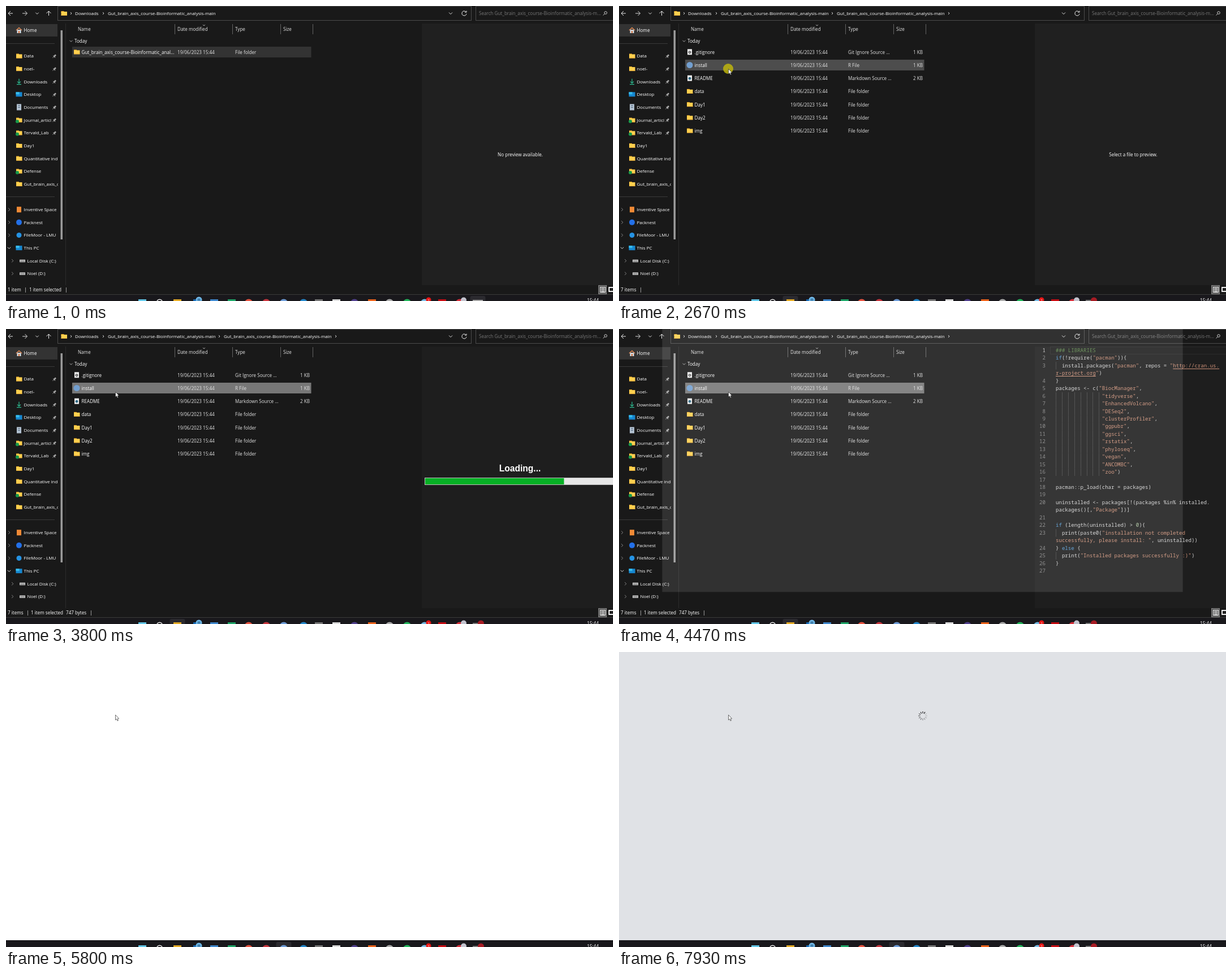
An HTML page with a canvas for the animation above (8000 ms loop, 1073 px wide and 522 px high).

```html
<!DOCTYPE html>
<html lang="en">
<head>
<meta charset="utf-8">
<title>Opening an R script</title>
<style>
  html, body { margin: 0; width: 100%; height: 100%; overflow: hidden; background: #191919; }
  canvas { display: block; }
</style>
</head>
<body>
<canvas id="stage" width="1073" height="522"></canvas>
<script>
const ctx = document.getElementById('stage').getContext('2d');
const LOOP = 8000;
const UI = '"Open Sans", "Noto Sans", sans-serif';
const MONO = '"Noto Sans Mono", "DejaVu Sans Mono", monospace';
const PROJECT = 'Gut_brain_axis_course-Bioinformatic_analysis-main';
const DATE = '19/06/2023 15:44';

const CODE = `### LIBRARIES
if(!require("pacman")){
  install.packages("pacman", repos = "http:/\/cran.us.¬r-project.org")
}
packages <- c("BiocManager",
               "tidyverse",
               "EnhancedVolcano",
               "DESeq2",
               "clusterProfiler",
               "ggpubr",
               "ggsci",
               "rstatix",
               "phyloseq",
               "vegan",
               "ANCOMBC",
               "zoo")

pacman::p_load(char = packages)

uninstalled <- packages[!(packages %in% installed.¬packages()[,"Package"])]

if (length(uninstalled) > 0){
  print(paste0("installation not completed¬successfully, please install: ", uninstalled))
} else {
  print("Installed packages successfully :)")
}
`.split('\n');

// Sidebar entries: label, icon, and whether pinned; null leaves a gap.
const SIDEBAR = [
  ['Data', 'folder', 1], ['noel-', 'folder', 1], ['Downloads', 'download', 1],
  ['Desktop', 'screen', 1], ['Documents', 'doc', 1], ['Journal_articl', 'synced', 1],
  ['Tervald_Lab', 'synced', 1], ['Day1', 'folder'], ['Quantitative ind', 'folder'],
  ['Defense', 'synced'], ['Gut_brain_axis_c', 'folder'], null,
  ['Inventive Space F', 'orange'], ['Packnest', 'blue'], ['FileMoor - LMU', 'sky'],
  ['This PC', 'screen'], ['Local Disk (C:)', 'drive'], ['Noel (D:)', 'drive'],
  ['Research (E:)', 'drive']
];

const FILES = [
  ['.gitignore', 'gear', 'Git Ignore Source ...', '1 KB'],
  ['install', 'script', 'R File', '1 KB'],
  ['README', 'note', 'Markdown Source ...', '2 KB'],
  ...['data', 'Day1', 'Day2', 'img'].map(name => [name, 'folder', 'File folder', ''])
];
const PROJECT_FOLDER = [['Gut_brain_axis_course-Bioinformatic_anal...', 'folder', 'File folder', '']];

// Time, x, y of the pointer tip.
const POINTER = [
  [70, 972, 490], [140, 905, 395], [200, 800, 265], [270, 670, 150], [300, 650, 144],
  [330, 647, 155], [450, 647, 155], [720, 440, 125], [990, 209, 76],
  [2160, 209, 76], [2340, 193, 111]
];
const PRESSES = [[1260, 1400], [1470, 1540], [2670, 2810], [3010, 3080]];
// Time, side inset, bottom edge, opacity of the new window.
const WINDOW_OPENING = [
  [4330, 107, 450, .02], [4400, 95, 457, .05], [4470, 77, 465, .1],
  [4540, 32, 490, .6], [4620, 2, 505, 1], [4690, 0, 510, 1]
];

function track(keys, t) {
  const next = keys.findIndex(key => key[0] > t);
  if (next === 0) return keys[0].slice(1);
  if (next < 0) return keys[keys.length - 1].slice(1);
  const a = keys[next - 1], b = keys[next], k = (t - a[0]) / (b[0] - a[0]);
  return a.slice(1).map((v, i) => v + (b[i + 1] - v) * k);
}

function rect(x, y, w, h, fill) {
  ctx.fillStyle = fill;
  ctx.fillRect(x, y, w, h);
}
function frame(x, y, w, h, color) {
  ctx.strokeStyle = color;
  ctx.lineWidth = 1;
  ctx.strokeRect(x + .5, y + .5, w - 1, h - 1);
}
function dot(x, y, r, fill) {
  ctx.fillStyle = fill;
  ctx.beginPath();
  ctx.arc(x, y, r, 0, Math.PI * 2);
  ctx.fill();
}
function line(points, color, width = 1) {
  ctx.strokeStyle = color;
  ctx.lineWidth = width;
  ctx.beginPath();
  points.forEach(([x, y]) => ctx.lineTo(x, y));
  ctx.stroke();
}
function text(s, x, y, { color = '#fff', font = `8.1px ${UI}`, align = 'left' } = {}) {
  ctx.font = font;
  ctx.textAlign = align;
  ctx.fillStyle = color;
  ctx.fillText(s, x, y + 2.9);
}
function chevron(x, y, dir, size = 2, color = '#ddd') {
  const turn = { right: 0, down: 1 }[dir] * Math.PI / 2;
  ctx.save();
  ctx.translate(x, y);
  ctx.rotate(turn);
  line([[-size / 2, -size], [size / 2, 0], [-size / 2, size]], color);
  ctx.restore();
}
function clipped(x, y, w, h, draw) {
  ctx.save();
  ctx.beginPath();
  ctx.rect(x, y, w, h);
  ctx.clip();
  draw();
  ctx.restore();
}

function icon(kind, x, y) {
  switch (kind) {
    case 'folder':
    case 'synced':
      rect(x - 5, y - 4, 5, 3, '#e8a826');
      rect(x - 5, y - 3, 10.5, 7, '#ffd04f');
      rect(x - 5, y + 3, 10.5, 1, '#eeb23a');
      if (kind === 'synced') dot(x - 3, y + 2.5, 3, '#179a4b');
      break;
    case 'download':
      line([[x, y - 5], [x, y + 3]], '#2dbf94', 1.2);
      line([[x - 3, y], [x, y + 3], [x + 3, y]], '#2dbf94', 1.2);
      line([[x - 4, y + 5], [x + 4, y + 5]], '#2dbf94', 1.2);
      break;
    case 'screen':
      rect(x - 5.5, y - 4, 11, 8, '#1687d0');
      rect(x - 5.5, y - 4, 6, 4, '#39bdec');
      break;
    case 'doc':
      rect(x - 4, y - 5.5, 8, 11, '#b3c2d1');
      rect(x - 2, y - 3, 4, 1, '#51677d');
      rect(x - 2, y, 4, 1, '#51677d');
      break;
    case 'drive':
      rect(x - 5, y - 2, 10, 4.5, '#c8c8c8');
      rect(x - 4, y, 8, 1, '#555');
      break;
    case 'gear':
    case 'note':
      rect(x - 4, y - 5, 8, 10, '#eee');
      dot(x, y + .5, 2.4, kind === 'gear' ? '#444' : '#2d6580');
      if (kind === 'gear') dot(x, y + .5, 1, '#eee');
      break;
    case 'script': dot(x, y, 5.5, '#729fd0'); break;
    case 'orange': rect(x - 4, y - 5, 8, 10, '#f08a35'); break;
    case 'blue': dot(x, y, 5, '#2370e8'); break;
    case 'sky': dot(x, y, 4.5, '#2593e4'); break;
  }
}

function drawToolbar(t) {
  line([[12, 13], [4, 13]], '#eee');
  line([[8, 9], [4, 13], [8, 17]], '#eee');
  line([[29, 13], [37, 13]], '#ddd');
  line([[33.5, 9], [37.5, 13], [33.5, 17]], '#ddd');
  chevron(55, 13, 'down', 2.7);
  line([[75.5, 17], [75.5, 9]], '#eee');
  line([[71.5, 13], [75.5, 9], [79.5, 13]], '#eee');

  frame(91, 0, 732, 26, '#4b4b4b');
  frame(830, 0, 250, 26, '#4b4b4b');
  icon('folder', 102.5, 13);
  const address = { font: `8px ${UI}` };
  chevron(115, 13, 'right');
  text('Downloads', 122, 13, address);
  chevron(172, 13, 'right');
  text(PROJECT, 180, 13, address);
  if (t >= 1670) {
    chevron(377, 13, 'right');
    text(PROJECT, 385, 13, address);
  }
  if (t >= 2070) chevron(583, 13, 'right');
  chevron(786, 13, 'down', 3);
  ctx.strokeStyle = '#eee';
  ctx.beginPath();
  ctx.arc(810, 13, 4, .2, Math.PI * 1.75);
  ctx.stroke();
  line([[814, 8.5], [814, 11], [811, 11]], '#eee');
  text('Search Gut_brain_axis_course-Bioinformatic_analysis-m...', 836, 13, { color: '#777' });
  ctx.strokeStyle = '#ccc';
  ctx.beginPath();
  ctx.arc(1060, 12, 2.3, 0, Math.PI * 2);
  ctx.stroke();
  line([[1058.3, 13.7], [1055.5, 16.5]], '#ccc');
}

function drawPin(x, y) {
  line([[x - 3.5, y + 3.5], [x - 1, y + 1]], '#aaa');
  line([[x - 2.5, y - .5], [x + 1, y + 3]], '#aaa', 1.2);
  line([[x - 1, y + 1], [x + 2, y - 2]], '#aaa', 2.6);
}

function drawSidebar() {
  rect(0, 32, 91, 22, '#333');
  line([[18, 43], [23, 38.5], [28, 43]], '#e18a55', 1.6);
  rect(19.5, 42, 7, 6, '#d7dce0');
  rect(22, 44, 2, 4, '#d06a35');
  text('Home', 31.5, 43);
  rect(0, 66, 86, 1, '#3a3a3a');
  rect(0, 337, 86, 1, '#3a3a3a');
  SIDEBAR.forEach((entry, i) => {
    if (!entry) return;
    const [label, kind, pinned] = entry, y = 88.4 + 22.65 * i;
    const indent = i > 15 ? 6 : 0;
    clipped(0, 31, pinned ? 80.5 : 92, 463, () => {
      icon(kind, 23 + indent, y);
      text(label, 31.5 + indent, y, { font: `8px ${UI}` });
    });
    if (pinned) drawPin(86, y);
    if (i > 11 && i < 18) chevron(5.5 + indent, y, i === 15 ? 'down' : 'right', 2.7, i === 15 ? '#ddd' : '#888');
  });
  rect(96.5, 43, 3.5, 370, '#9a9a9a');
  rect(105, 31, 1, 463, '#2b2b2b');
}

function drawFiles(t, [px, py]) {
  [['Name', 127], ['Date modified', 303], ['Type', 405], ['Size', 490]]
    .forEach(([label, x]) => text(label, x, 41, { color: '#e4e4e4' }));
  [298, 400, 485, 542].forEach(x => rect(x, 32, 1, 18, '#636363'));
  chevron(350, 34, 'down', 2, '#aaa');
  if (t >= 1670 && t < 1730) return;

  chevron(115, 62, 'down', 2.5, '#aaa');
  text('Today', 121, 62);
  const opened = t >= 1730;
  const selected = opened ? (t >= 2810 ? 1 : -1) : 0;
  const focused = opened || t >= 1400;
  (opened ? FILES : PROJECT_FOLDER).forEach(([name, kind, type, size], i) => {
    const y = 81.8 + 23.2 * i, top = Math.round(y - 10);
    const hovered = t >= 70 && px > 117 && px < 540 && py >= top && py < top + 19;
    const fill = i === selected ? (focused ? '#777' : hovered ? '#4d4d4d' : '#333') : hovered ? '#4d4d4d' : null;
    if (fill) rect(117, top, 422.5, 19, fill);
    icon(kind, 125, y - .5);
    text(name, 133.5, y);
    const detail = { color: '#e4e4e4' };
    text(DATE, 303, y, detail);
    text(type, 405, y, detail);
    text(size, 537, y, { ...detail, align: 'right' });
  });
}

function tokenColor(token) {
  if (token[0] === '"') return '#ce9178';
  if (token[0] === '#') return '#608b4e';
  if (token === '0') return '#b5cea8';
  return /^(if|else)$/.test(token) ? '#569cd6' : '#d4d4d4';
}

function drawCode() {
  const left = 772, advance = 5.455, pitch = 13.45, font = `500 ${advance / .6}px ${MONO}`;
  let row = 0;
  const rowY = () => 38 + row * pitch;
  frame(762, 31, 320, 14, '#2b2b2b');
  CODE.forEach((source, n) => {
    text(n + 1, 754, rowY(), { color: n ? '#858585' : '#c6c6c6', font, align: 'right' });
    const indent = source.search(/\S/);
    for (let c = 0; c < indent; c += 2) rect(Math.round(left + c * advance), rowY() - 6.7, 1, pitch, '#404040');
    let col = 0;
    source.split(/("[^"]*"|\bif\b|\belse\b|\b0\b)/).forEach(token => {
      const color = tokenColor(token);
      token.split('¬').forEach((chunk, i) => {
        if (i) { row++; col = 0; }
        const x = left + col * advance;
        text(chunk, x, rowY(), { color, font });
        const link = chunk.match(/http:.*|r-project\.org/);
        if (link) rect(x + link.index * advance, Math.round(rowY() + 5), link[0].length * advance, 1, color);
        col += chunk.length;
      });
    });
    row++;
  });
}

function drawPreview(t) {
  rect(735, 31, 338, 463, t < 3080 ? '#202020' : '#1e1e1e');
  if (t < 2810) {
    text(t < 1730 ? 'No preview available.' : 'Select a file to preview.', 909, 263, { align: 'center' });
  } else if (t >= 4000) {
    drawCode();
  } else if (t >= 3140) {
    text('Loading...', 908.5, 249, { font: 'bold 15.6px "Liberation Sans", sans-serif', align: 'center' });
    rect(740, 263, 337, 13, '#e6e6e6');
    rect(741, 264, 245 * (t - 3140) / 660, 11, '#06b025');
    frame(740, 263, 337, 13, '#bcbcbc');
  }
}

function drawStatus(t) {
  const parts = t < 1670 ? [['1 item', 3], ['|', 32.5], ['1 item selected', 41], ['|', 104]]
    : [['7 items', 3], ['|', 36.5],
      ...(t < 2810 ? [] : [['1 item selected', 44], ['747 bytes', 106], ['|', 148]])];
  parts.forEach(([s, x]) => text(s, x, 502));
  rect(1047, 494, 15, 16, '#555');
  frame(1047, 494, 15, 16, '#888');
  frame(1050, 497, 10, 10, '#eee');
  for (let y = 499; y < 506; y += 2) rect(1052, y, 6, 1, '#eee');
  rect(1065, 497, 8, 9, '#eee');
  rect(1067, 499, 6, 5, '#222');
  rect(0, 510, 1073, 1, '#3a3a3a');
}

function drawTaskbar(t) {
  rect(0, t < 4690 ? 511 : 510, 1073, 12, '#19181c');
  const active = t < 200 ? 834 : t < 1400 ? 0 : t < 4540 ? 303 : 491;
  if (active) {
    ctx.fillStyle = '#2b2a2f';
    ctx.beginPath();
    ctx.roundRect(active - 13.5, 513, 27, 20, 3);
    ctx.fill();
  }
  const squares = { 241: '#62c5e6', 303: '#e3aa27', 338: '#1769b5', 368: '#3f87cc', 399: '#1fa467',
    553: '#777', 584: '#ddd', 647: '#e9621b', 771: '#c40d13' };
  const circles = { 429: '#e65340', 460: '#c6363e', 491: '#6d9bd6', 526: '#2486c9', 616: '#51408d',
    678: '#aaa', 709: '#23b45b', 740: '#75bae4', 802: '#d6303b' };
  for (const x in squares) rect(+x - 7, 519, 14, 4, squares[x]);
  for (const x in circles) dot(+x, 526, 7.5, circles[x]);
  dot(271.5, 524, 5.5, '#eee');
  dot(271.5, 524, 4, '#19181c');
  dot(341, 520, 5.5, '#70b8e7');
  rect(338.5, 518, 5, 1, '#174c78');
  rect(338.5, 520, 5, 1, '#174c78');
  dot(747, 520, 4.5, '#e81717');
  text('2', 747, 519.8, { font: `6px ${UI}`, align: 'center' });
  dot(809, 520.5, 5, '#c3c3ce');
  if (t < 200) rect(825, 520, 18, 2, '#aaa');
  else {
    rect(825, 520, 13, 2, '#777');
    dot(839.5, 521, 5.5, '#a71c24');
  }
  text('15:44', 1027, 521, { font: `8.2px ${UI}` });
}

function drawNewWindow(t) {
  const [inset, bottom, alpha] = track(WINDOW_OPENING, t);
  ctx.globalAlpha = alpha;
  rect(inset, 0, 1073 - 2 * inset, bottom, t < 6660 ? '#fff' : '#e0e2e6');
  if (t >= 5070 && t < 5800) {
    ctx.globalAlpha = t < 5130 ? .5 : 1;
    dot(537.5, 221.5, 82.5, '#75aadb');
  }
  ctx.globalAlpha = 1;
  if (t >= 6730) drawSpinner(t);
}

function drawSpinner(t) {
  const head = Math.floor((t - 6630) / 100);
  for (let i = 0; i < 12; i++) {
    const age = (head - i + 24) % 12, angle = i * Math.PI / 6;
    const dx = Math.sin(angle), dy = -Math.cos(angle);
    line([[537 + 4.5 * dx, 113 + 4.5 * dy], [537 + 8 * dx, 113 + 8 * dy]],
      `rgba(30,30,32,${Math.max(.2, .95 - age * .075)})`, 1.3);
  }
}

function drawPointer(t, [x, y]) {
  if (t < 70) return;
  if (PRESSES.some(([down, up]) => t >= down && t < up)) dot(x, y, 9, 'rgba(198,188,10,.8)');
  ctx.save();
  ctx.translate(x + .5, y + .3);
  ctx.beginPath();
  [[0, 0], [0, 9], [2, 7.2], [3.4, 10.5], [4.9, 9.9], [3.6, 6.8], [6.1, 6.5]]
    .forEach(p => ctx.lineTo(...p));
  ctx.closePath();
  ctx.fillStyle = '#fff';
  ctx.fill();
  ctx.strokeStyle = '#222';
  ctx.lineWidth = .65;
  ctx.stroke();
  ctx.restore();
}

function draw() {
  const t = performance.now() % LOOP, pointer = track(POINTER, t);
  rect(0, 0, 1073, 522, '#191919');
  if (t < 4690) {
    drawToolbar(t);
    drawSidebar();
    drawFiles(t, pointer);
    drawPreview(t);
    drawStatus(t);
  }
  if (t >= 4330) drawNewWindow(t);
  drawTaskbar(t);
  drawPointer(t, pointer);
  requestAnimationFrame(draw);
}
draw();
</script>
</body>
</html>
```
